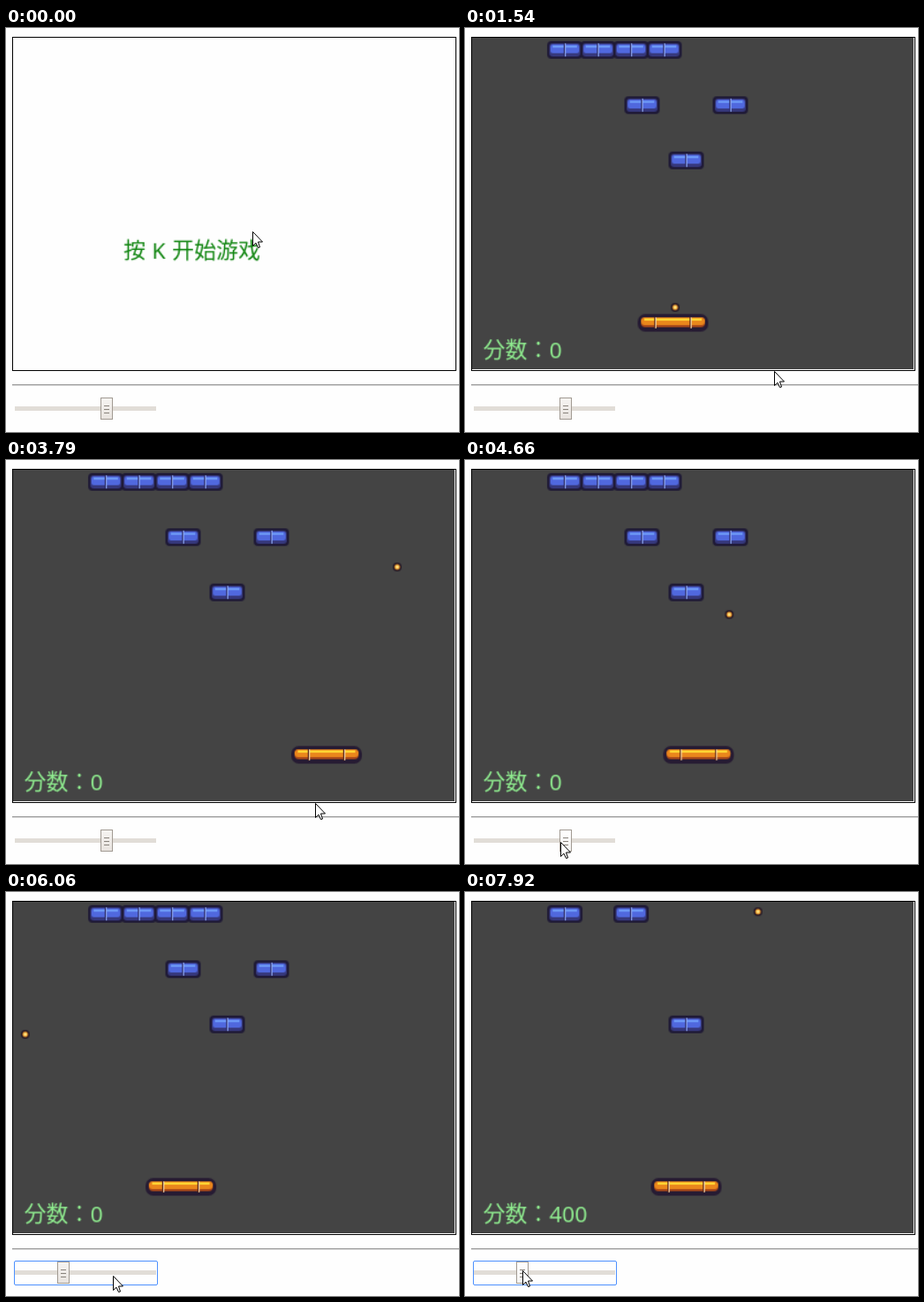
Write an HTML page with a canvas that moves like this. It is 513x457 px and loops after 8 s.

```html
<!DOCTYPE html>
<html>
<head>
<meta charset="utf-8">
<title>Brick game</title>
<style>
html, body { margin: 0; width: 100%; height: 100%; overflow: hidden; background: #fefefe; }
canvas { display: block; }
</style>
</head>
<body>
<canvas id="stage" width="513" height="457"></canvas>
<script>
const page = document.getElementById('stage').getContext('2d');
// The game is drawn at 400 x 300 and enlarged by 1.25 on the page.
const board = document.createElement('canvas');
board.width = 400;
board.height = 300;
const g = board.getContext('2d');

const LOOP = 8000, START = 1540, SERVE = 3190, TICK = 87.6;
const DRAG = [4910, 5324], FOCUS = 4800;
const SLOW = 11.81, FAST = 21.2;   // ball pixels per tick
const SUBSTEPS = 50;

// [from, to, x, y]
const MOUSE = [[420, 820, 350, 388], [4040, 4670, 108, 432], [...DRAG, 59, 432],
  [5640, 6150, 131, 434], [7400, 7900, 65, 428]];
// [key press, where the paddle stops]
const KEYS = [[SERVE, 252], [4285, 162], [4850, 120], [6600, 150], [7420, 162]];

// [first x, count, spacing]
const BRICKS = [[68, 4, 30], [138, 2, 80], [178, 1, 0]].flatMap(([x, count, gap], row) =>
  Array.from({ length: count }, (_, i) => ({ x: x + i * gap, y: 3 + row * 50 })));

const clamp = (v, lo, hi) => Math.min(hi, Math.max(lo, v));
const progress = (t, a, b) => clamp((t - a) / (b - a), 0, 1);

const thumbAt = t => 107 - 49 * progress(t, ...DRAG);

function mouseAt(t) {
  let x = 279, y = 230;
  for (const [a, b, tx, ty] of MOUSE) {
    const p = progress(t, a, b);
    x += (tx - x) * p;
    y += (ty - y) * p;
  }
  return [Math.round(x), Math.round(y)];
}

function paddleAt(t) {
  let x = 150;
  for (const [press, stop] of KEYS) {
    const reach = Math.max(0, t - press) * 0.2;
    x += clamp(stop - x, -reach, reach);
  }
  return x;
}

// Plays the ball from the serve up to the given tick.
function play(ticks) {
  if (ticks < 0) return { x: 184, y: 244, bricks: BRICKS };
  let x = 199.6, y = 236.4, vx = 1, vy = -1, bricks = BRICKS;
  for (let i = 0; i < ticks * SUBSTEPS; i++) {
    const t = SERVE + i / SUBSTEPS * TICK;
    const step = (SLOW + (FAST - SLOW) * (thumbAt(t) - 58) / 49) / SUBSTEPS;
    x += vx * step;
    y += vy * step;
    if (x < 4) vx = 1;
    if (x > 396) vx = -1;
    if (y < 4) vy = 1;
    if (y > 243.5) vy = -1;
    const hit = bricks.find(b => x > b.x - 6 && x < b.x + 38 && y > b.y + 1 && y < b.y + 17);
    if (hit) {
      vy = -vy;
      bricks = bricks.filter(b => b !== hit);
    }
  }
  return { x, y, bricks };
}

function rect(c, x, y, w, h, color) {
  c.fillStyle = color;
  c.fillRect(x, y, w, h);
}

function pill(x, y, w, h, r, color) {
  g.fillStyle = color;
  g.beginPath();
  g.roundRect(x, y, w, h, r);
  g.fill();
}

function frame(x, y, w, h, color) {
  page.strokeStyle = color;
  page.lineWidth = 1;
  page.strokeRect(x + 0.5, y + 0.5, w - 1, h - 1);
}

function write(str, x, y, color) {
  g.font = '20px "Noto Sans", "Noto Sans CJK JP", "Noto Sans CJK SC", sans-serif';
  g.wordSpacing = '0.6px';
  g.fillStyle = color;
  g.fillText(str, x, y);
}

function drawBrick({ x, y }) {
  pill(x, y, 32, 16, 4, '#1f1a36');
  pill(x + 2, y + 2, 28, 12, 3, '#36387c');
  pill(x + 3, y + 3, 26, 8, 2, '#5068de');
  rect(g, x + 5, y + 4, 22, 2, '#6c98f6');
  rect(g, x + 15, y + 2, 1, 12, '#2c2c68');
  rect(g, x + 16, y + 2, 1, 12, '#8ca6f2');
}

function drawPaddle(x) {
  const y = 250;
  pill(x, y, 64, 16, 7, '#261b33');
  pill(x + 3, y + 3, 58, 9, 4, '#a8481a');
  pill(x + 3, y + 3, 58, 7, 3.5, '#ea861c');
  rect(g, x + 6, y + 4, 52, 2, '#ffd634');
  for (const d of [15, 47]) {
    rect(g, x + d, y + 3, 1, 10, '#5a2616');
    rect(g, x + d + 1, y + 3, 1, 10, '#f6d8ac');
  }
}

function drawBall(x, y) {
  pill(x - 4, y - 4, 8, 8, 4, '#261a28');
  pill(x - 2.5, y - 2.5, 5, 5, 2.5, '#e2851c');
  pill(x - 1.5, y - 1.5, 3, 3, 1, '#ffe27c');
}

function drawGame(t, tick) {
  const { x, y, bricks } = play(tick);
  rect(g, 0, 0, 400, 300, '#444');
  bricks.forEach(drawBrick);
  drawPaddle(paddleAt(t));
  drawBall(Math.round(x), Math.round(y));
  write('分数：' + (BRICKS.length - bricks.length) * 100, 10, 290, '#90ee90');
}

function drawSlider(x, hover, focus) {
  rect(page, 10, 428, 160, 5, '#e1ddd7');
  const fill = page.createLinearGradient(0, 418, 0, 443);
  fill.addColorStop(0, hover ? '#ffffff' : '#f6f4f2');
  fill.addColorStop(1, hover ? '#f5f3f1' : '#e8e3de');
  rect(page, x, 418, 14, 25, fill);
  frame(x, 418, 14, 25, '#a19a92');
  for (const y of [427, 431, 435]) rect(page, x + 4, y, 6, 1, '#88827b');
  if (focus) {
    page.strokeStyle = '#4d90fe';
    page.beginPath();
    page.roundRect(9.5, 417.5, 162, 27, 1.5);
    page.stroke();
  }
}

function drawMouse(x, y) {
  const shape = [[0, 0], [0, 16], [3.5, 12.7], [6, 18], [8, 17.5], [6, 11.5], [11, 11.5]];
  page.beginPath();
  for (const [dx, dy] of shape) page.lineTo(x + dx + 0.5, y + dy + 0.5);
  page.closePath();
  page.fillStyle = '#fff';
  page.fill();
  page.strokeStyle = '#000';
  page.lineWidth = 1;
  page.stroke();
}

function draw(now) {
  const tick = Math.floor((now - SERVE + 25) / TICK);
  const t = SERVE + tick * TICK;

  g.clearRect(0, 0, 400, 300);
  if (now < START) write('按 K 开始游戏', 100, 200, '#108510');
  else drawGame(t, tick);

  rect(page, 0, 0, 513, 457, '#fefefe');
  frame(7, 10, 503, 378, '#000');
  page.drawImage(board, 8, 11, 500, 375);
  rect(page, 7, 403, 506, 1, '#999');
  rect(page, 7, 404, 506, 1, '#dcdcdc');

  const [mx, my] = mouseAt(t), thumb = Math.round(thumbAt(t));
  const hover = mx >= thumb && mx < thumb + 14 && my >= 418 && my < 443;
  drawSlider(thumb, hover, t > FOCUS);
  drawMouse(mx, my);
}

function loop() {
  draw(performance.now() % LOOP);
  requestAnimationFrame(loop);
}
loop();
</script>
</body>
</html>
```
